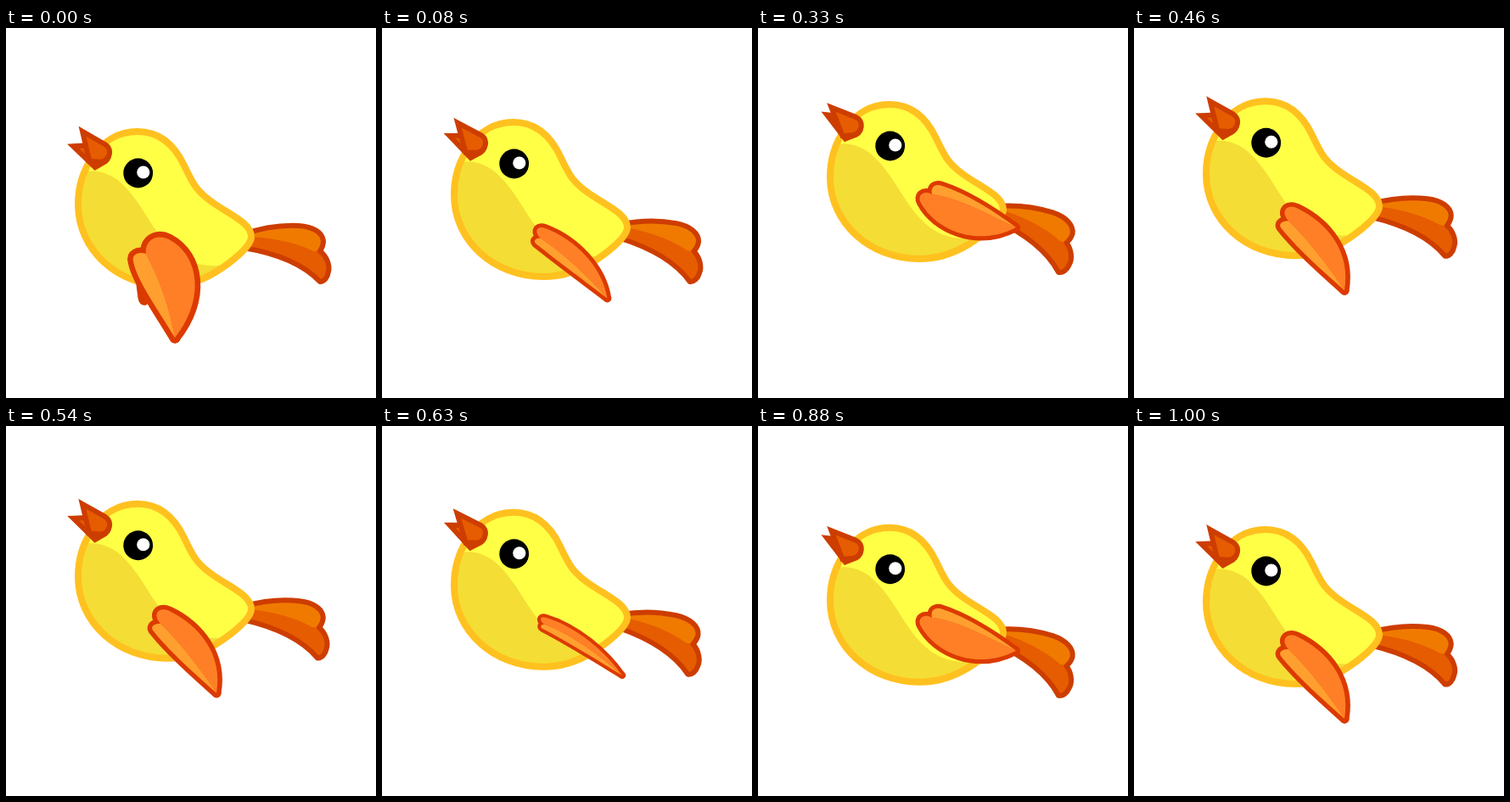
An HTML page without scripts for the animation above (1.04 s loop, 436x436 px).

```html
<!DOCTYPE html>
<html lang="en">
<head>
<meta charset="utf-8">
<title>Flying bird</title>
<style>
@property --f { syntax: "<number>"; inherits: true; initial-value: 0; }

html, body { margin: 0; width: 100%; height: 100%; overflow: hidden; background: #fff; }
svg { display: block; width: 100%; height: 100%; }

/* --f ticks 0..24; lift, tail and beak derive from it */
.bird {
  --lap1: min(var(--f) / 6, 2 - var(--f) / 6);
  --lap2: min((var(--f) - 12) / 7, (25 - var(--f)) / 6);
  --up: max(0, var(--lap1), var(--lap2));
  --gape: max(0, 1 - 1.15 * var(--up) * var(--up));
  --rise: calc(1 - min(var(--f), 12) / 12);
  --sink: calc(1 - max(0, var(--f) - 12) / 12);
  transform: translateY(calc(36px * (var(--rise) * var(--rise) - var(--sink) * var(--sink))));
  animation: tick 1.04s steps(25) -3ms infinite;
}
@keyframes tick { from { --f: 0; } to { --f: 25; } }

.tail { transform-origin: 285px 250px; transform: rotate(calc(23deg * var(--up))); }
.jaw { transform-origin: 114px 149px; transform: rotate(calc(-17deg * var(--gape))); }
.bill { transform-origin: 114px 149px; transform: rotate(calc(16deg * var(--gape))); }

/* wing poses, lowest to highest */
.main {
  --p0: path("M165 266C163 250 178 242 192 249C228 268 235 320 199 365C192 325 180 295 165 266Z");
  --p1: path("M182 263C172 252 180 243 192 248C228 265 256 300 248 345C230 318 205 285 182 263Z");
  --p2: path("M191 254C184 248 187 244 193 246C230 257 264 287 283 314C252 286 215 262 191 254Z");
  --p3: path("M205 228C195 222 187 230 192 238C209 270 258 291 304 267C275 254 238 232 205 228Z");
  --p4: path("M206 214C194 214 185 223 187 233C193 267 265 281 308 220C275 221 240 220 206 214Z");
  --p5: path("M195 200C186 202 182 214 183 225C188 268 268 277 297 170C262 186 232 196 195 200Z");
  fill: #ff7f27;
}
.lobe {
  --p0: path("M165 266C156 263 148 267 150 275C154 297 178 330 199 365C192 325 180 295 165 266Z");
  --p1: path("M182 263C175 263 170 266 173 271C190 293 220 320 248 345C230 318 205 285 182 263Z");
  --p2: path("M191 254C187 254 186 257 189 259C220 275 255 297 283 314C252 286 215 262 191 254Z");
  --p3: path("M205 228C203 219 209 215 217 218C248 228 278 248 304 267C275 254 238 232 205 228Z");
  --p4: path("M206 214C199 204 202 194 214 194C246 194 282 204 308 220C275 221 240 220 206 214Z");
  --p5: path("M195 200C186 192 186 170 204 166C235 165 265 165 297 170C262 186 232 196 195 200Z");
  fill: #ff9f2f;
}
.far {
  --p0: path("M156 290Q157 305 159 318Q160 324 164 323Q170 318 180 300L180 280Z");
  --p1: path("M195 180Q205 185 215 190Q220 192 222 196Q230 210 235 220L220 230Z");
  --p4: path("M195 153Q215 151 234 151Q240 151 242 156Q253 176 259 200L230 215Z");
  --p5: path("M195 153Q230 141 267 128Q273 126 274 132Q277 150 277 170L230 200Z");
  fill: #e65c00;
}
.main, .lobe, .far { d: var(--p0); animation: flap 1.04s step-end -3ms infinite; }
.edge { stroke: #dc3a00; stroke-linejoin: round; }
.far.edge { stroke: #d43b00; stroke-width: 7px; animation-name: flap-far; }

@keyframes flap {
  0%, 48%, 100% { d: var(--p0); stroke-width: 13px; }
  4%, 52% { d: var(--p1); stroke-width: 11px; animation-timing-function: steps(2); }
  44%, 96% { d: var(--p1); stroke-width: 11px; }
  36%, 60%, 88% { d: var(--p2); stroke-width: 8px; animation-timing-function: steps(2); }
  12% { d: var(--p2); stroke-width: 8px; }
  16%, 32%, 68%, 84% { d: var(--p3); stroke-width: 10px; }
  20%, 28%, 72%, 80% { d: var(--p4); stroke-width: 13px; }
  24%, 76% { d: var(--p5); stroke-width: 14px; }
}
@keyframes flap-far {
  0%, 48%, 100% { d: var(--p0); }
  4%, 32%, 44%, 52%, 84%, 96% { d: var(--p1); }
  20%, 28%, 72%, 80% { d: var(--p4); }
  24%, 76% { d: var(--p5); }
}
</style>
</head>
<body>
<svg viewBox="0 0 436 436">
  <defs>
    <path id="body" d="M155 122C182 122 199 139 210 162C220 183 224 193 247 208C268 222 289 231 289 246C289 258 264 277 248 287C230 298 210 304 190 304C132 304 85 262 85 208C85 185 91 168 103 150C115 133 133 122 155 122Z"/>
    <path id="beak" d="M83.5 129.5L114 137C124 140 124 154 114 158L101 161Z"/>
    <clipPath id="inside"><use href="#body"/></clipPath>
  </defs>
  <g class="bird">
    <path class="far edge"/>
    <g class="tail">
      <path fill="#e65c00" d="M280 243C300 236 325 232 345 233C362 234 373 241 374 251C374 256 372 260 370 263C378 269 382 280 380 287C379 294 375 299 370 299C352 280 322 266 280 259Z"/>
      <path fill="#f07a00" d="M280 243C300 236 325 232 345 233C362 234 373 241 374 251C374 258 368 264 362 263C340 252 310 246 280 246Z"/>
      <path fill="none" stroke="#cd3d00" stroke-width="6" stroke-linejoin="round" stroke-linecap="round" d="M280 243C300 236 325 232 345 233C362 234 373 241 374 251C374 256 372 260 370 263C378 269 382 280 380 287C379 294 375 299 370 299C352 280 322 266 280 259"/>
    </g>
    <use href="#body" fill="#ffff46"/>
    <path clip-path="url(#inside)" fill="#f4dd35" d="M80 174C95 166 112 166 130 178C163 204 170 242 204 268C221 280 242 282 262 279V320H80Z"/>
    <use href="#body" fill="none" stroke="#ffc11f" stroke-width="8"/>
    <g fill="#e65c00" stroke="#cd3d00" stroke-width="6">
      <use class="jaw" href="#beak"/>
      <use class="bill" href="#beak"/>
    </g>
    <circle cx="155.7" cy="171" r="17.4"/>
    <circle cx="161.8" cy="170" r="7.6" fill="#fff"/>
    <path class="main edge"/>
    <path class="lobe edge"/>
    <path class="main"/>
    <path class="lobe"/>
  </g>
</svg>
</body>
</html>
```
